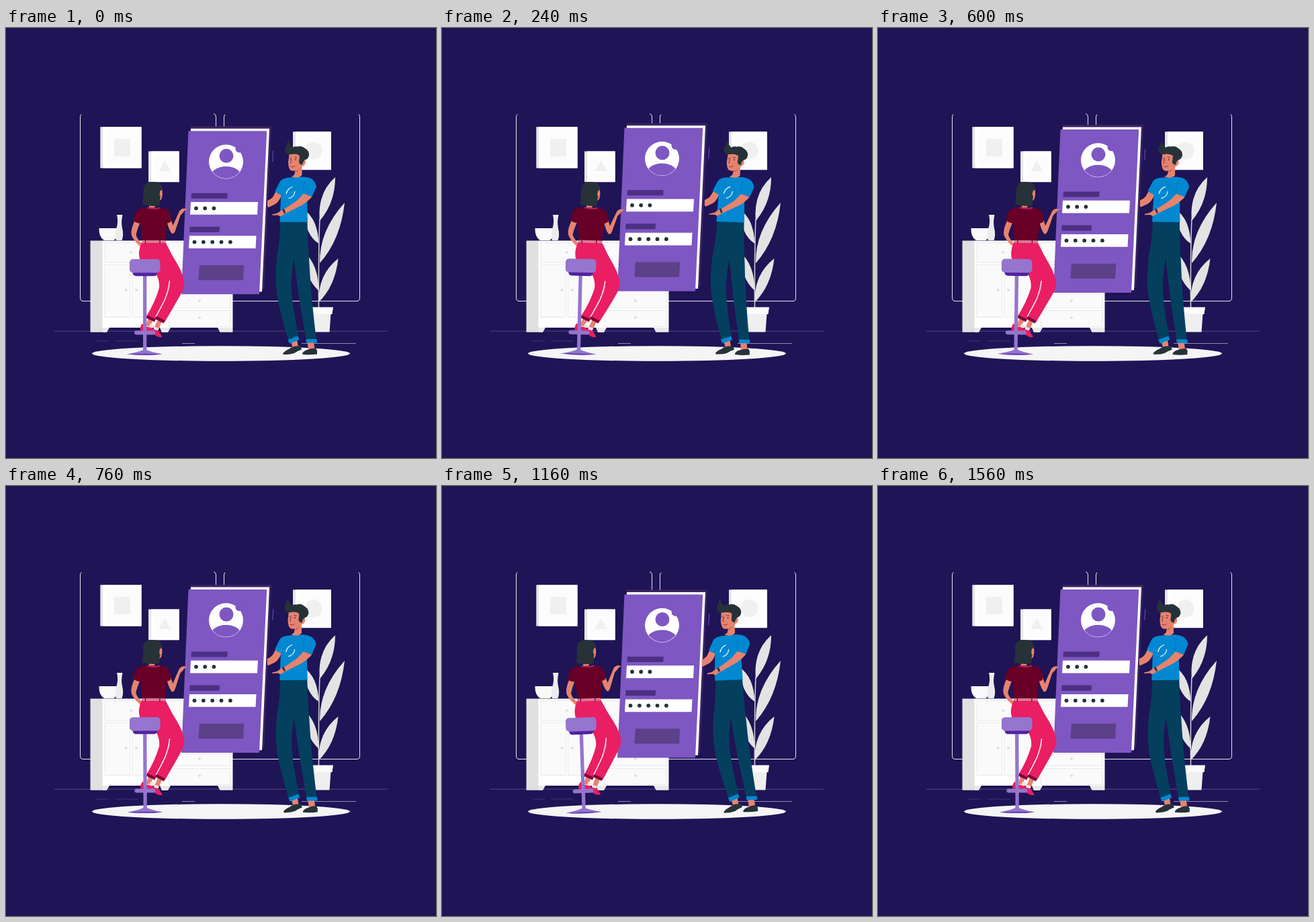
These frames come from a looping animation (640 px wide and 640 px high, 1.6 s). An HTML page:

```html
<!DOCTYPE html>
<html lang="en">
<head>
<meta charset="utf-8">
<title>Sign-in panel</title>
<style>
  html, body { margin: 0; width: 100%; height: 100%; overflow: hidden; background: #1f1456; }
  svg { display: block; width: 100vw; height: 100vh; }
  .line { fill: none; stroke: #fff; stroke-width: .9; }
  .seam { fill: #fafafa; stroke: #e4e4e4; stroke-width: .8; }
  .skin { fill: #e6836f; }
  .ink { fill: #263238; }
  .pink { fill: #e91e63; }
  .lilac { fill: #9575cd; }
  .violet { fill: #7e57c2; }
  .label { fill: #4c2f82; }
  .blue { fill: #0288d1; }
  .leaf { fill: #e3e3e3; }
</style>
</head>
<body>
<svg viewBox="0 0 640 640">
  <!-- room -->
  <path class="line" d="M112.5 128.5Q110.5 129.5 110.5 132V402Q110.5 406.5 115 406.5H308Q312.5 406.5 312.5 402V132Q312.5 128.500 309 127.500"/>
  <path class="line" d="M326.500 129Q324.500 129.500 324.500 132V402Q324.500 406.500 329 406.500H522Q526.500 406.500 526.500 402V132Q526.500 129.500 524.500 128.500"/>
  <path d="M72 451.200H568" stroke="#514884"/>
  <path d="M134 466H153M163 466H196" stroke="#403672"/>
  <path d="M262 469.500H281M440 469.500H521" stroke="#9089ad"/>
  <ellipse cx="320" cy="484.500" rx="192" ry="11.300" fill="#f5f5f5"/>

  <g id="frames"></g>

  <!-- dresser -->
  <path d="M125.500 316.500H144V446H152L150 452.800H125.500Z" fill="#e0e0e0"/>
  <path d="M144 446H154L150 452.800H144ZM229 446H245L241 453H232ZM315 446H337.500V452.800H318.500Z" fill="#e9e9e9"/>
  <path d="M143.500 316.500H337.500V446H143.500Z" fill="#fff"/>
  <g class="seam">
    <path d="M147 319.500H235V349H147ZM147 352H184.500V430.500H147ZM187.500 352H235V430.500H187.500Z"/>
    <path d="M242 319.500H334V349H242ZM242 352H334V382H242ZM242 386H334V416.500H242ZM242 420.500H334V444.500H242Z"/>
  </g>
  <g id="knobs" fill="#e0e0e0"></g>
  <path d="M138.500 298H167.500Q168 311 160.500 316H146Q138 311 138.500 298Z" fill="#fafafa"/>
  <path d="M165 278H173.500Q171 289 173 298Q175.500 308 172.500 316H164Q161 307 164.500 298Q167.500 288 165 278Z" fill="#ececec"/>

  <!-- plant -->
  <path d="M467 284Q465 330 465.500 418" stroke="#d5d5d5" stroke-width="1.500" fill="none"/>
  <g class="leaf">
    <path d="M467 287Q463 246 490 222Q490 260 467 287Z"/>
    <path d="M467 350Q466 302 504 260Q498 315 467 350Z"/>
    <path d="M465.500 408Q464 367 494.500 343Q490 384 465.500 408Z"/>
    <path d="M465.500 321Q445 308 443 270Q464 284 465.500 321Z"/>
    <path d="M465.500 391Q444 372 444 334Q465 352 465.500 391Z"/>
  </g>
  <path d="M449 425H483.500L481.500 452.500H451Z" fill="#efefef"/>
  <path d="M445 415.500H487L485.500 426H446.500Z" fill="#fafafa"/>

  <!-- floating panel -->
  <g id="panel">
    <path d="M309 142.300H315" stroke="#55369a"/>
    <path d="M397.800 182L396.700 199" stroke="#6842b4" stroke-width="1.200"/>
    <path d="M275 146.200H395L384 389H265Z" fill="#3a2460"/>
    <path d="M275 149.800H392L381 392.500H264Z" fill="#fff"/>
    <path class="violet" d="M271.500 153.200H388.200L377 396.200H261Z"/>
    <clipPath id="disc"><circle cx="327.500" cy="199" r="25"/></clipPath>
    <circle cx="327.500" cy="199" r="25.500" fill="#fff"/>
    <g class="violet">
      <circle cx="347.500" cy="179.500" r="6"/>
      <circle cx="328" cy="190.300" r="10.500"/>
      <ellipse cx="327.500" cy="223" rx="24" ry="17" clip-path="url(#disc)"/>
    </g>
    <path class="label" d="M276 245.700H329.700L329.300 253.700H275.500ZM273.600 295.700H318L317.600 304H273.200Z"/>
    <path d="M275 259H375L374 277.800H274ZM273 309.200H372.500L371.500 328H272Z" fill="#fff"/>
    <path d="M288 353H354.200L353 375.200H286.500Z" fill="#5c4088"/>
    <g id="dots" class="ink"></g>
  </g>

  <!-- woman on stool -->
  <g id="woman">
    <g class="skin">
      <path d="M193 284Q184 302 187.500 310Q191 318 203 328L205 323Q195 315 193.500 308Q195 300 200 289Z"/>
      <path d="M239 286Q242 300 246.500 305.500Q249 308 251.500 303Q255 293 259.500 279Q264 274.500 266 271.500L270 269.500L265 268.500Q259 269 257 275Q252 286 248.500 294L245 284Z"/>
      <path d="M213 258H221.500V270H213ZM227 237H231.500Q233.500 245 232.500 250Q232 256 228 257.500Z"/>
      <path d="M212 431L219 434L214.500 445L208 443ZM226 434L232 437L226.500 450L220 447Z"/>
    </g>
    <path d="M215 440L221 443L217.500 447L212.500 445ZM221 444.500L227.500 447L225.500 451L219 449Z" fill="#f7dfe5"/>
    <path class="pink" d="M203 440L209.500 444.500L216 446L214 452L200 450.500Q199 444 203 440ZM213 446L219 448L227 451Q230 456 232.500 459.500Q228 461.500 222 457.500Q216 453 212 452.500Z"/>
    <path class="pink" d="M202 319H237.500Q246 337 256 353Q265 369 265.500 382Q264 390 258 400Q248 418 236 438L222.500 431Q235 411 242.500 390Q246 379 240 365L222 348Z"/>
    <path class="pink" d="M202 319L237 322Q231 345 240 360Q245 367 244.500 377Q244 388 238 402Q230 418 222 435L209 429Q222 408 228 387Q229 377 224 367L200 347Q195 334 202 319Z"/>
    <path d="M243.500 376Q242 390 236.500 404Q230 417 223 430" fill="none" stroke="#f7f0f5" stroke-width="1.500"/>
    <path d="M210 427.500L222.800 433.500L221 437.500L208.500 431.500ZM224 429L236.500 435.500L234.500 439.500L222 433Z" fill="#80003a"/>
    <path d="M204 267.500Q194 269 191.500 278L188.800 286.500Q194 290.500 200.500 291L203 317.500H237.500L239.500 290.500Q243 290.500 245.500 288Q246 276 241.500 272Q238 268 230 267.500Z" fill="#680027"/>
    <path d="M202.500 316H237L238 320H202Z" fill="#d87993"/>
    <path d="M207.500 315V320.500M229 315V320.500" stroke="#680027" stroke-width="1.200"/>
    <path d="M210 266.500Q219 269.500 229 266.500V269Q219 271 210 268.500Z" fill="#b2205a"/>
    <path class="ink" d="M204.500 238Q207 229 217 229Q228 228.500 231.500 234.500Q232.500 238 231.500 242Q229 241 229 245Q228 249 230 251Q228 258 229 264Q215 266.500 203 262.500Q205 249 204.500 238Z"/>
    <path d="M204 368H209.300V479Q215 482 233 485.500Q207 488.500 180 485.500Q198 482 204 479Z" class="lilac"/>
    <path d="M180 485.300Q207 483.800 233 485.300Q207 488.800 180 485.300Z" fill="#6a43b5"/>
    <rect class="lilac" x="191" y="450.500" width="31" height="6" rx="3"/>
    <path d="M188.500 363H225.500Q225.500 369.200 220 369.200H194Q188.500 369.200 188.500 363Z" fill="#5122a0"/>
    <rect class="lilac" x="184" y="344" width="45.500" height="20.300" rx="5"/>
  </g>

  <!-- man -->
  <g id="man">
    <path class="skin" d="M403 241L410 249Q406 260 399 263L390.500 267L389 265V257Q396 254 398 250ZM424 467L433 463L435 475L427 477ZM448.500 466H458L459.500 479H450Z"/>
    <path class="ink" d="M412 485Q414 481 421 478Q427 473 434 473.500L438.500 473.500L440 478.500Q433 481 429 484Q422 486.500 413 486ZM441 484.500Q443 480 450 478.500Q454 476.500 461 476.500L463 480V485.500Q452 487 441.500 485.800Z"/>
    <path d="M408.500 287H448.500Q449 320 451.500 350Q454 400 462 464.500H446.500Q441 430 436 400Q432 370 428.500 343Q424 370 425 392Q428 425 435.500 459.500L420.500 465.500Q408 425 403 395Q400 370 403 342Q408 315 408.500 287Z" fill="#04405e"/>
    <path class="blue" d="M419.500 464L434.500 458.500L436.500 464L422 469.800ZM446.500 463H462.500L463 468.500H447Z"/>
    <path class="blue" d="M422 222.500Q412 223 408 228L400.500 243Q405 247.500 409.500 248Q408 270 407.500 288.800H449L448 252Q453 252.500 456 250L462 236Q460 225 450 222.500Q442 221 438 221.500Z"/>
    <path d="M445 228Q442 236 443 247" fill="none" stroke="#0270b0" stroke-width=".8"/>
    <path d="M417 247Q419 238.500 426.500 236.500M430 243Q429 252 420.500 253.500" fill="none" stroke="#fff" stroke-width="1.200"/>
    <path class="skin" d="M443 246.500L455.500 251Q449 259 440 264L416 276L409.500 280Q406 280 405 278.500L396.500 278.800L396 277.500L404 275.500Q410 271 414 269.500Q426 262 434 256Z"/>
    <path d="M412.500 269.500L415 275.500" stroke="#263238" stroke-width="2.800"/>
    <path class="skin" d="M430 205L440.500 203V219Q435 225 424.500 221Q431 220 430 211Z"/>
    <path d="M430 211Q435 211 438 207Q436 214 431 215Z" fill="#cf6759"/>
    <path class="skin" d="M421.500 186Q421 194 420 200Q420.500 210 424 212Q430 214 436 210L441 206Q446 204 446 199Q445 195 442 197L441 185Z"/>
    <path class="ink" d="M421 167Q420.500 173 426 178Q429 175.500 434 176.500Q440 174.500 445 179Q451.500 183 451 189Q450 195 445.500 196Q442 198 441 203.500Q437.500 203.500 436 200L437 190Q432 186.500 424 188Q416 189 415 182Q415 177 418 175Q418 170 421 167Z"/>
    <path d="M422 194.500L425 193.500M429 192.500L433 193M424 198Q422.500 201 424 202" fill="none" stroke="#3e2b30" stroke-width=".8"/>
    <path d="M423.500 206Q427 208 430 205" fill="none" stroke="#a02d3b"/>
    <g class="ink"><circle cx="424.500" cy="196.500" r=".9"/><circle cx="431" cy="196" r=".9"/></g>
  </g>
</svg>
<script>
  const $ = id => document.getElementById(id);
  const circles = (id, r, pts) => {
    $(id).innerHTML = pts.map(([x, y]) => `<circle cx="${x}" cy="${y}" r="${r}"/>`).join('');
  };
  const picture = (x, y, s, art) => `
    <rect x="${x}" y="${y}" width="${s}" height="${s}" fill="#e6e6e6"/>
    <rect x="${x + 4}" y="${y}" width="${s - 4}" height="${s}" fill="#fff"/>
    <rect x="${x + 9}" y="${y + 5}" width="${s - 14}" height="${s - 10}" fill="#fcfcfc"/>
    <g fill="#f0f0f0">${art}</g>`;

  $('frames').innerHTML =
    picture(140.3, 147.2, 61.3, '<rect x="161" y="165" width="24" height="26"/>') +
    picture(212, 183.5, 45.7, '<path d="M236.5 197L245.500 213H227Z"/>') +
    picture(427, 154.300, 56.800, '<circle cx="457.500" cy="182.300" r="13"/>');
  circles('knobs', 2.1, [[186, 334], [178.500, 390], [194, 390], [288, 406], [288, 431]]);
  circles('dots', 2.9, [
    ...[283, 296.200, 309.400].map(x => [x, 268.300]),
    ...[0, 1, 2, 3, 4].map(i => [280.500 + i * 13.350, 318.600])
  ]);

  const LOOP = 1600, STEP = 40, PEAK = 1160;
  const sway = d => 1 - 2 * Math.pow(d / 680, 1.25);
  const rest = sway(440);

  function draw(now) {
    const t = Math.floor(now % LOOP / STEP) * STEP;
    const gap = Math.abs(t - PEAK);
    const d = Math.min(gap, LOOP - gap);     // time away from the lowest point
    const lean = rest - sway(d);
    $('panel').setAttribute('transform', `translate(0 ${(440 - d) * 0.0186})`);
    $('woman').setAttribute('transform', `rotate(${lean * 1.7} 222 350)`);
    $('man').setAttribute('transform', `rotate(${lean * 2.15} 430 320)`);
  }

  const start = performance.now();
  function tick() {
    draw(performance.now() - start);
    requestAnimationFrame(tick);
  }
  tick();
</script>
</body>
</html>
```
